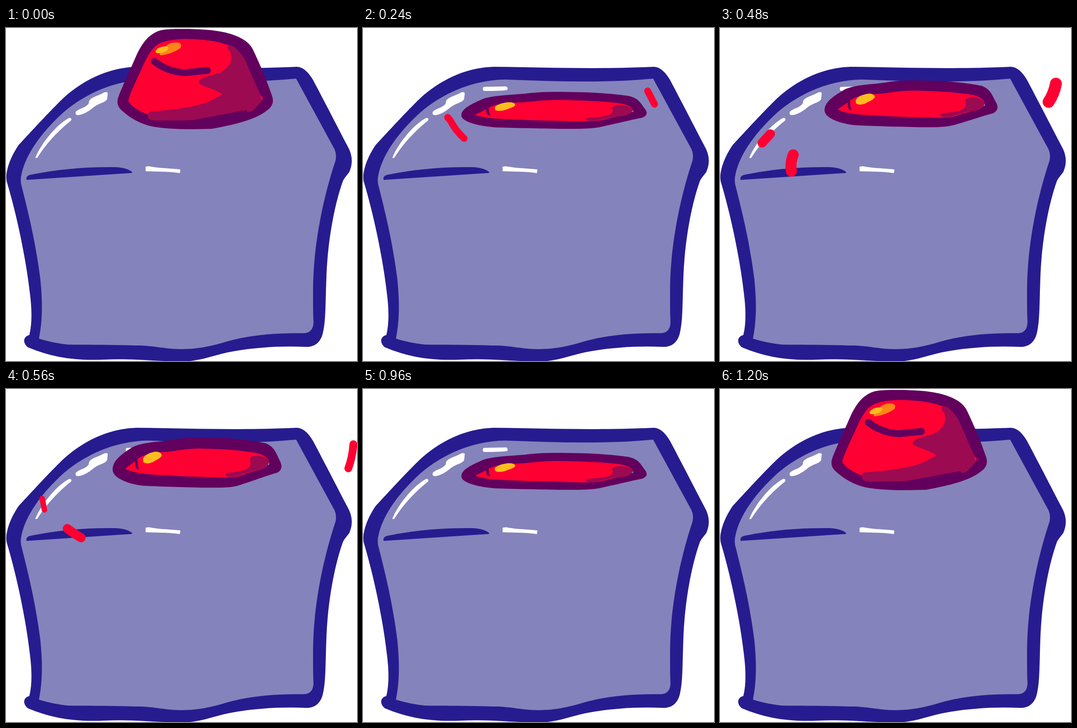
Animation, 767 px wide and 730 px high, one loop 2 s. Source, as an HTML page:

```html
<!DOCTYPE html>
<html lang="en">
<head>
<meta charset="utf-8">
<title>Button press</title>
<style>
html, body { margin: 0; width: 100%; height: 100%; overflow: hidden; background: #fff; }
svg { display: block; width: 767px; height: 730px; }
.navy { fill: #271c8f; }
.body { fill: #8583bb; }
.plum { fill: #62005d; }
.red { fill: #ff0032; }
.wine { fill: #9c0a52; }
.gold { fill: #ffbc1e; }
.line { fill: none; stroke: #62005d; stroke-linecap: round; stroke-linejoin: round; }
.drops path { fill: none; stroke: #ff0032; stroke-linecap: round; stroke-linejoin: round; }
.drops .blob { fill: #ff0032; stroke: none; }
</style>
</head>
<body>
<svg viewBox="0 0 767 730">
  <!-- box -->
  <path class="navy" d="M635 85C649 85 661 97 671 114C688 146 718 204 750 266C757 282 758 298 750 316C744 324 739 329 736 336C715 395 702 480 700 550C698 600 699 640 693 666C689 688 675 700 655 699C590 696 530 702 485 711C450 719 420 731 385 731C330 731 270 724 215 727C148 730 98 721 48 700C37 692 36 677 51 673C58 645 56 610 52 580C42 495 22 405 2 338C-3 318 8 285 28 256C55 227 95 183 125 154C170 113 225 87 285 85C400 86 500 91 635 85Z"/>
  <path class="body" d="M634 111L718 266Q723 277 720 291C692 375 671 480 671 575C671 610 671 625 672 645Q671 669 650 669C590 668 530 673 480 688C440 700 415 704 380 704C340 703 320 695 280 696C230 694 180 695 135 694Q100 690 72 681C80 640 80 600 75 550C65 475 55 430 35 350Q30 336 34 320C44 274 79 229 119 191C164 149 234 114 310 113C420 117 530 121 634 111Z"/>
  <path class="navy" d="M45 333Q43 325 52 322C110 310 170 304 240 305Q262 306 275 315Q277 318 272 318Z"/>
  <g fill="#fff">
    <path d="M305 304L312 303C330 307 350 307 381 310L380 318C350 314 330 315 305 314Z"/>
    <path d="M64 285C72 262 105 215 138 197Q145 197 142 203C115 225 90 250 68 285Z"/>
    <path d="M153 183C160 176 175 175 181 165C180 152 200 150 215 141Q224 139 222 146L221 156C215 165 203 164 190 175C180 183 168 191 155 191Q150 188 153 183Z"/>
    <path d="M264 129L313 128Q318 132 315 136Q300 138 264 138Q259 133 264 129Z"/>
  </g>

  <g id="raised">
    <path class="plum" d="M335 6C345 2 370 2 390 2C420 2 455 4 480 10C510 18 530 28 540 48C555 80 568 110 580 145C586 160 583 168 576 176C555 195 525 207 450 221C400 222 360 223 320 216C290 209 268 195 250 178C242 168 242 160 247 147C260 115 272 90 285 60C298 32 312 14 335 6Z"/>
    <path class="red" d="M324 42C340 27 370 24 395 24C440 25 465 30 487 38L500 90L473 146L400 185L311 190C290 182 275 172 267 160C272 140 285 115 297 88C305 70 312 55 324 42Z"/>
    <path class="wine" d="M487 38Q481 44 490 52C497 75 485 90 465 99C445 105 425 108 421 118C423 128 445 128 473 145C445 168 390 178 315 183Q307 188 311 198Q316 204 335 203C370 202 400 204 412 201C445 195 483 188 525 180Q527 186 535 183C545 178 552 168 561 157L557 148Q540 112 527 80Q519 60 503 45Q495 36 487 38Z"/>
    <path class="red" d="M556 147L561 152L560 158L557 156Z"/>
    <path class="line" stroke-width="15" d="M324 73C345 90 370 97 391 98L440 93"/>
    <path fill="#ff8519" d="M350 40C355 33 370 30 380 33Q385 38 381 44C370 52 355 58 338 60Q332 57 340 51Z"/>
    <path class="gold" d="M328 49C330 44 340 40 352 40Q357 43 352 49C345 54 335 56 329 55Q325 52 328 49Z"/>
  </g>

  <g id="pressed">
    <path class="plum" d="M242 167C243 145 262 130 284 113C310 99 345 101 372 94C400 88 430 90 470 91C510 93 545 100 560 104C580 113 583 133 590 148C595 161 594 170 584 177C565 183 535 197 510 206C490 215 465 214 435 214C390 213 340 211 305 209C270 204 240 188 242 167Z"/>
    <path class="red" d="M268 167L288 149C300 135 315 128 345 126C375 124 385 118 420 117C470 118 510 121 545 129Q567 138 567 152C560 165 540 172 520 179C500 190 490 189 470 189C420 187 360 185 310 180Q285 177 268 167Z"/>
    <path class="wine" d="M478 178C490 175 505 176 520 168C530 162 530 155 527 143Q530 135 540 135C555 134 565 142 567 150C565 165 552 172 538 172C520 175 505 187 490 188Q475 188 478 178Z"/>
    <path class="body" d="M564 157L568 151L567 158Z"/>
    <path class="line" stroke-width="5" d="M291 143L292 160L294 166"/>
    <path class="gold" d="M305 143C308 133 318 128 330 125Q343 124 344 134C342 142 332 145 325 151Q312 157 306 151Z"/>
  </g>

  <!-- splash: start, burst, break-up, last drops -->
  <g class="drops">
    <path stroke-width="15" d="M185 196L191 203Q203 226 221 242M622 138L637 167"/>
  </g>
  <g class="drops">
    <path class="blob" fill-rule="evenodd" d="M91 243Q91 233 103 226C130 208 165 195 200 188Q210 189 210 198L211 210Q221 212 221 222C218 242 208 260 198 275C188 288 182 303 172 310Q162 316 150 311Q142 304 143 290C147 268 168 242 183 222C165 231 147 240 137 250Q127 264 115 263Q107 261 103 254Q91 250 91 243ZM113 242L125 234L121 240Z"/>
    <path class="blob" d="M613 149Q613 139 635 135Q619 134 622 126C632 112 650 109 668 110C690 112 705 109 722 108Q731 110 731 121C728 140 718 150 711 162Q705 169 695 168C672 161 648 158 622 158Q613 157 613 149Z"/>
  </g>
  <g class="drops">
    <path stroke-width="20" d="M110 232L92 252"/>
    <path stroke-width="24" d="M160 278Q153 295 156 314"/>
    <path stroke-width="26" d="M734 122Q730 144 718 162"/>
  </g>
  <g class="drops">
    <path stroke-width="12" d="M79 240L84 265"/>
    <path stroke-width="20" d="M134 306Q150 318 164 326"/>
    <path stroke-width="17" d="M759 121Q757 150 748 174"/>
  </g>
</svg>
<script>
const LOOP = 2000;
// button extents: left, top, width, height
const UP = [243, 2, 340, 220];
const HALF = [242, 90, 351, 124];
const FLAT = [215, 140, 405, 81];

const mix = (a, b, t) => a.map((v, i) => v + (b[i] - v) * t);
const bounce = n => mix(HALF, FLAT, 1 / 3 + 2 / 3 * (-0.5) ** n);
const REST = mix(HALF, FLAT, 1 / 3);
const RISING = mix(UP, FLAT, 0.5);

// start time, drawing, extent, splash stage
const steps = [
  [0, 'raised', UP], [120, 'raised', RISING],
  [240, 'pressed', bounce(0), 0], [360, 'pressed', bounce(1), 1],
  [480, 'pressed', bounce(2), 2], [560, 'pressed', REST, 3],
  [840, 'pressed', HALF], [960, 'pressed', FLAT],
  [1080, 'raised', RISING], [1200, 'raised', UP]
];
const buttons = {
  raised: { el: document.getElementById('raised'), box: UP },
  pressed: { el: document.getElementById('pressed'), box: HALF }
};
const drops = document.querySelectorAll('.drops');
const show = (el, on) => el.style.display = on ? '' : 'none';

function fit({ el, box: [x, y, w, h] }, [left, top, width, height]) {
  el.setAttribute('transform',
    `translate(${left} ${top}) scale(${width / w} ${height / h}) translate(${-x} ${-y})`);
}

function draw(now) {
  const time = now % LOOP;
  const [, name, box, splash] = steps.findLast(step => step[0] <= time);
  for (const key in buttons) show(buttons[key].el, key === name);
  fit(buttons[name], box);
  drops.forEach((group, i) => show(group, i === splash));
}

const start = performance.now();
function tick() {
  draw(performance.now() - start);
  requestAnimationFrame(tick);
}
tick();
</script>
</body>
</html>
```
